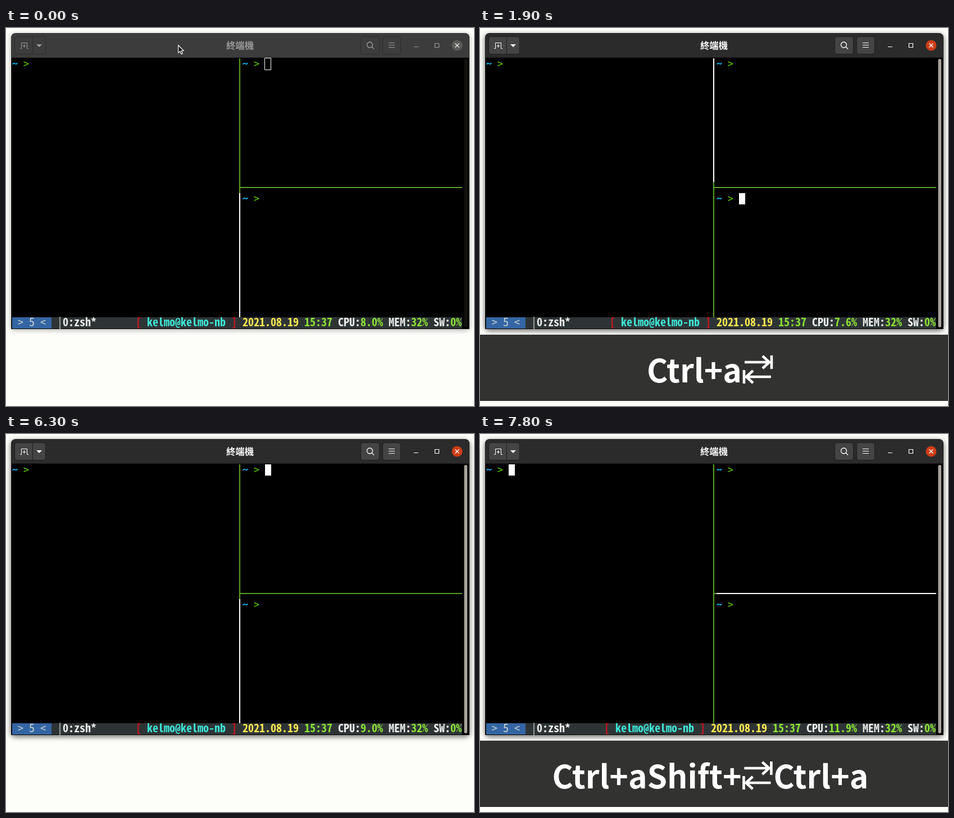
Animation, 833 px wide and 673 px high, one loop 8000 ms. Source, as an HTML page with a canvas:

```html
<!DOCTYPE html>
<html lang="zh-Hant">
<head>
<meta charset="utf-8">
<title>終端機</title>
<style>
html, body { margin: 0; width: 100%; height: 100%; overflow: hidden; background: #fdfdf9; }
canvas { display: block; }
</style>
</head>
<body>
<canvas id="stage" width="833" height="673"></canvas>
<script>
const ctx = document.getElementById('stage').getContext('2d');
const LOOP = 8000, STEP = 100;
const CELL = 10, ROW = 20, LEFT = 11, TOP = 54;
const SANS = '"Noto Sans CJK TC", "Noto Sans CJK JP", "Noto Sans CJK SC", "Noto Sans", sans-serif';
const MONO = '"Noto Sans Mono CJK TC", "Noto Sans Mono CJK JP", "Noto Sans Mono", monospace';
const GREEN = '#58a020', WHITE = '#ffffff', TAB = '\t', TAB_WIDTH = 57;

// Timelines: [start, value]
const panes = [[0, 'top'], [1900, 'bottom'], [2800, 'left'], [3500, 'top'], [7000, 'left']];
const cpuLoads = [[0, '8.0'], [1400, '7.6'], [3200, '9.0'], [7800, '11.9']];
const pointer = [[0, [306, 30]], [100, [309, 35]], [200, [311, 40]], [700, [320, 27]],
  [800, [330, 10]], [900, [336, -1]], [1100, null]];

// Key presses, grouped by the visibility of the banner: [start, underline end, parts]
const banners = [
  { end: 6300, keys: [
    [1300, 1500, ['Ctrl+a']], [1700, 1900, [TAB]],
    [2300, 2500, ['Ctrl+a']], [2600, 2800, [TAB]],
    [3100, 3300, ['Ctrl+a']], [3300, 3600, [TAB]]] },
  { end: LOOP, keys: [
    [6500, 6700, ['Ctrl+a']], [6900, 7100, ['Shift+', TAB]], [7700, 7800, ['Ctrl+a']]] }
];

const at = (timeline, t) => timeline.filter(entry => entry[0] <= t).pop()[1];
const clamp = x => Math.max(0, Math.min(1, x));
const mix = (a, b, k) => `rgb(${a.map((v, i) => Math.round(v + (b[i] - v) * k))})`;
const gray = (a, b, k) => mix([a, a, a], [b, b, b], k);

function sizeFor(sample, width, weight, family) {
  ctx.font = `${weight} 100px ${family}`;
  return 100 * width / ctx.measureText(sample).width;
}
const monoSize = sizeFor('0', CELL, 400, MONO);
const keyFont = `bold ${sizeFor('Ctrl+a', 169, 'bold', SANS)}px ${SANS}`;

function rect(x, y, w, h, color) {
  ctx.fillStyle = color;
  ctx.fillRect(x, y, w, h);
}

function rounded(x, y, w, h, r, color) {
  ctx.fillStyle = color;
  ctx.beginPath();
  ctx.roundRect(x, y, w, h, r);
  ctx.fill();
}

function stroke(path, color, width = 1) {
  ctx.strokeStyle = color;
  ctx.lineWidth = width;
  ctx.stroke(new Path2D(path));
}

function fill(path, color) {
  ctx.fillStyle = color;
  ctx.fill(new Path2D(path));
}

function cells(col, row, text, color, bold = true) {
  ctx.font = `${bold ? 'bold ' : ''}${monoSize}px ${MONO}`;
  ctx.fillStyle = color;
  ctx.fillText(text, LEFT + col * CELL, TOP + row * ROW + 17);
}

function shadow(offset, blur, spread, alpha) {
  ctx.save();
  ctx.shadowColor = `rgba(0,0,0,${alpha})`;
  ctx.shadowBlur = blur;
  ctx.shadowOffsetX = 2000;
  ctx.shadowOffsetY = offset;
  rounded(9 - spread - 2000, 9 - spread, 816 + 2 * spread, 527 + 2 * spread, 9, '#000');
  ctx.restore();
}

function drawWindow(focus) {
  shadow(3, 9, 1, 0.5 * focus);
  shadow(2, 6, 2, 0.2 * (1 - focus));
  rounded(9, 9, 816, 527, [8, 8, 0, 0], gray(50, 30, focus));
  rounded(10, 10, 814, 42, [7, 7, 0, 0], gray(60, 43, focus));
  rect(10, 53, 814, 483, '#000');

  const ink = gray(155, 255, focus), edge = gray(43, 30, focus);
  for (const [x, w] of [[15, 56], [631, 34], [670, 33]]) {
    rounded(x, 15, w, 32, 5, edge);
    rounded(x + 1, 16, w - 2, 30, 4, gray(61, 68, focus));
  }
  rect(47, 16, 1, 30, edge);
  stroke('M25 36.5H27.5V26.5H37.5V36.5H40M29.5 32H35.5M32.5 29V35', ink);
  fill('M54 29H64L59 34Z', ink);
  stroke('M652.5 30a5 5 0 1 1-10 0a5 5 0 1 1 10 0M651 33.5L655 37.5', ink, 1.3);
  stroke('M681 26.5H692M681 30.5H692M681 34.5H692', ink);
  stroke('M726 33.5H734M763.5 27.5H770.5V34.5H763.5Z', ink, 1.2);
  fill('M812.5 31a9.5 9.5 0 1 1-19 0a9.5 9.5 0 1 1 19 0', mix([91, 91, 88], [204, 62, 24], focus));
  stroke('M799.5 27.5L806.5 34.5M806.5 27.5L799.5 34.5', gray(235, 255, focus), 1.4);

  ctx.font = `bold 16.4px ${SANS}`;
  ctx.fillStyle = ink;
  ctx.textAlign = 'center';
  ctx.fillText('終端機', 416.5, 36.5);
  ctx.textAlign = 'left';

  rounded(815.5, 55, 5.5, 478, 3, mix([20, 18, 14], [170, 164, 156], focus));
}

function drawPanes(active, focused) {
  const prompts = { left: [0, 0], top: [41, 0], bottom: [41, 12] };
  for (const [col, row] of Object.values(prompts)) {
    cells(col, row, '~', '#10afec');
    cells(col + 2, row, '>', '#5fd700', false);
  }
  rect(415, 54, 2, 461, GREEN);
  rect(417, 283, 395, 2, GREEN);
  if (active === 'top') rect(415, 294, 2, 221, WHITE);
  if (active === 'bottom') rect(415, 54, 2, 220, WHITE);
  if (active === 'left') rect(421, 283, 391, 2, WHITE);

  const [col, row] = prompts[active];
  const x = LEFT + (col + 4) * CELL, y = TOP + row * ROW;
  if (focused) rect(x, y, 11, 20, WHITE);
  else stroke(`M${x - .5} ${y - .5}h11v21h-11Z`, WHITE);
}

function drawStatus(cpu) {
  rect(LEFT, 515, 801, 20, '#2e3436');
  rect(LEFT, 515, 70, 20, '#3465a4');
  cells(1, 23, '> 5 <', '#d3d7cf', false);
  cells(8, 23, '|', '#d3d7cf', false);
  cells(9, 23, '0:zsh*', '#eeeeec');

  const lime = '#8ae234', light = '#eeeeec', red = '#cc1420';
  const parts = [['[ ', red], ['kelmo@kelmo-nb', '#3ce6d6'], [' ] ', red],
    ['2021.08.19 ', '#fce94f'], ['15:37 ', lime], ['CPU:', light], [cpu + '% ', lime],
    ['MEM:', light], ['32% ', lime], ['SW:', light], ['0%', lime]];
  let col = 80 - parts.reduce((sum, [text]) => sum + text.length, 0);
  for (const [text, color] of parts) {
    cells(col, 23, text, color);
    col += text.length;
  }
}

function drawTabKey(x) {
  ctx.save();
  ctx.translate(x, 582);
  stroke('M5 13H49M37 2L49 13L37 24M53 1V25M52 39H8M20 28L8 39L20 50M4 27V51', WHITE, 4.6);
  ctx.restore();
}

function drawBanner(t) {
  const banner = banners.find(b => t >= b.keys[0][0] && t < b.end);
  if (!banner) return;
  rect(0, 546, 833, 118, '#323230');
  ctx.font = keyFont;
  const width = part => part === TAB ? TAB_WIDTH : ctx.measureText(part).width;
  const keys = banner.keys.filter(([start]) => start <= t);
  let x = 410 - keys.flatMap(key => key[2]).reduce((sum, part) => sum + width(part), 0) / 2;

  keys.forEach(([, underlineEnd, parts], i) => {
    const start = x;
    for (const part of parts) {
      ctx.fillStyle = WHITE;
      if (part === TAB) drawTabKey(x);
      else ctx.fillText(part, x, 631);
      x += width(part);
    }
    if (i === keys.length - 1 && t < underlineEnd) rect(start, 637, x - start, 3, WHITE);
  });
}

function drawPointer(position) {
  if (!position) return;
  ctx.save();
  ctx.translate(...position);
  const arrow = 'M.7 .8V14.2L3.8 11.4L6 16.4L8.3 15.4L6.1 10.5H10.2Z';
  fill(arrow, '#111');
  stroke(arrow, WHITE, 1.2);
  ctx.restore();
}

function draw(t) {
  const focus = clamp((t - 500) / 300);
  rect(0, 0, 833, 673, '#fdfdf9');
  drawWindow(focus);
  drawPanes(at(panes, t), focus > 0);
  drawStatus(at(cpuLoads, t));
  drawBanner(t);
  drawPointer(at(pointer, t));
}

const origin = performance.now();
function tick() {
  const t = (performance.now() - origin) % LOOP;
  draw(Math.floor(t / STEP) * STEP);
  requestAnimationFrame(tick);
}
tick();
</script>
</body>
</html>
```
